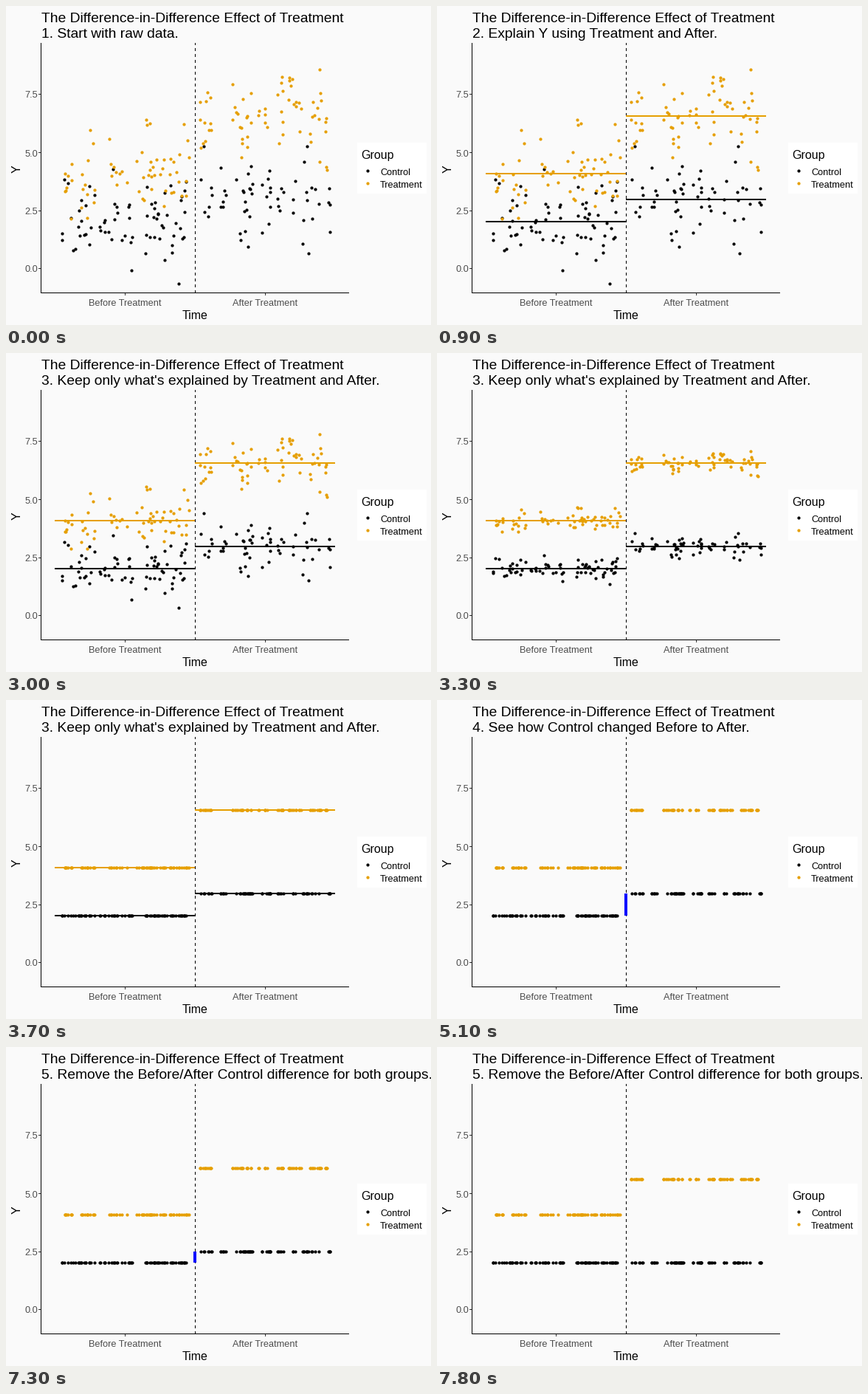
Write a matplotlib script that moves like this. It is 576x432 px and loops after 8000 ms.

```python
import numpy as np
import matplotlib.pyplot as plt
from matplotlib.animation import FuncAnimation
from matplotlib.patches import Rectangle

W, H = 576, 432
INK, GOLD, GREY = "black", "#E69F00", "#4D4D4D"
UNIT = 31.47  # pixels per unit of Y
SPLIT = 255.5
LOW, HIGH = 291.5, 261.5  # control mean before and after
DIFF = LOW - HIGH
plt.rcParams["font.family"] = ["Liberation Sans", "DejaVu Sans"]
plt.rcParams["toolbar"] = "None"

CAPTIONS = [
    (0, "1. Start with raw data."),
    (5, "2. Explain Y using Treatment and After."),
    (26, "3. Keep only what's explained by Treatment and After."),
    (47, "4. See how Control changed Before to After."),
    (68, "5. Remove the Before/After Control difference for both groups."),
]

fig = plt.figure(figsize=(W / 72, H / 72), dpi=72, facecolor="#FAFAFA")
ax = fig.add_axes([0, 0, 1, 1])
# Whole numbers are pixel centres.
ax.set(xlim=(-0.5, W - 0.5), ylim=(H - 0.5, -0.5))
ax.axis("off")


def text(x, y, s, size, color=INK, **kw):
    return ax.text(x, y, s, size=size, color=color, **kw)


def line(xs, ys, color=INK, lw=1, z=2, **kw):
    return ax.plot(xs, ys, color=color, lw=lw, zorder=z, snap=False,
                   solid_capstyle="butt", dash_capstyle="butt", **kw)[0]


def dots(x, y, color):
    return ax.plot(x, y, "o", ms=4.2, mew=0, color=color, zorder=3, snap=False)[0]


def draw_frame():
    line([47, 47], [49.5, 388.5])
    line([46.5, 464.5], [388, 388])
    for value in (0, 2.5, 5, 7.5):
        y = round(355.4 - UNIT * value)
        line([43.5, 46.5], [y, y], "#333333")
        text(42.5, y + 5, f"{value:.1f}", 12.8, GREY, ha="right")
    for x, label in ((161, "Before Treatment"), (351, "After Treatment")):
        line([x, x], [388.5, 391.5], "#333333")
        text(x - 0.5, 405, label, 12.8, GREY, ha="center")
    line([256, 256], [388.5, 49.5], dashes=(4, 4))
    text(256, 424, "Time", 16, ha="center")
    text(14.5, 220, "Y", 16, rotation=90, ha="center", va="center")
    text(47, 21.5, "The Difference-in-Difference Effect of Treatment", 19.2)

    ax.add_patch(Rectangle((475.5, 184.5), 94, 69, fc="white", lw=0))
    text(480.5, 206, "Group", 16)
    for y, label, color in ((222.5, "Control", INK), (239.5, "Treatment", GOLD)):
        dots([489.5], [y], color)
        text(506.5, y + 6, label, 12.8)


class Group:
    """Normal scatter around a mean, spread evenly over some x spans."""

    def __init__(self, color, mean, after, count, spans):
        lo, hi = np.array(spans).T
        pick = rng.choice(len(spans), count, p=(hi - lo) / (hi - lo).sum())
        noise = rng.normal(size=count)
        noise = (noise - noise.mean()) / noise.std()
        self.mean, self.after = mean, after
        self.y = mean + 0.95 * UNIT * noise
        x = np.round(rng.uniform(lo[pick], hi[pick])) + 0.5
        self.dots = dots(x, self.y, color)
        ends = (SPLIT, 445.5) if after else (65.5, SPLIT)
        self.line = line(ends, [mean, mean], color, 2, z=4)

    def update(self, collapse, shift, show_line):
        y = self.y + (self.mean - self.y) * collapse
        self.dots.set_ydata(y + DIFF * shift * self.after)
        self.line.set_visible(show_line)


def ease(step):
    t = np.clip(step / 12, 0, 1)
    return (1 - np.cos(np.pi * t)) / 2


draw_frame()
rng = np.random.default_rng(12)
groups = [
    Group(INK, LOW, False, 72, [(72, 133), (138, 170), (188, 247)]),
    Group(GOLD, 226.5, False, 64, [(74, 120), (138, 169), (175, 248)]),
    Group(INK, HIGH, True, 62, [(263, 282), (289, 334), (345, 376), (386, 438)]),
    Group(GOLD, 148.5, True, 70, [(261, 277), (306, 356), (365, 402), (410, 435)]),
]
caption = text(47, 42.5, "", 19.2)
bar = line([SPLIT, SPLIT], [LOW, HIGH], "blue", 4, z=5)


def update(i):
    caption.set_text([s for start, s in CAPTIONS if i >= start][-1])
    collapse, shift = ease(i - 25), ease(i - 67)
    if shift > 0.98:
        shift = 1
    for g in groups:
        g.update(collapse, shift, 9 <= i < 47)
    bar.set_ydata([LOW, HIGH + DIFF * shift])
    bar.set_visible(i >= 51 and shift < 1)


anim = FuncAnimation(fig, update, frames=80, init_func=lambda: update(0),
                     interval=100, repeat=True, repeat_delay=0, blit=False)
plt.show()
```
